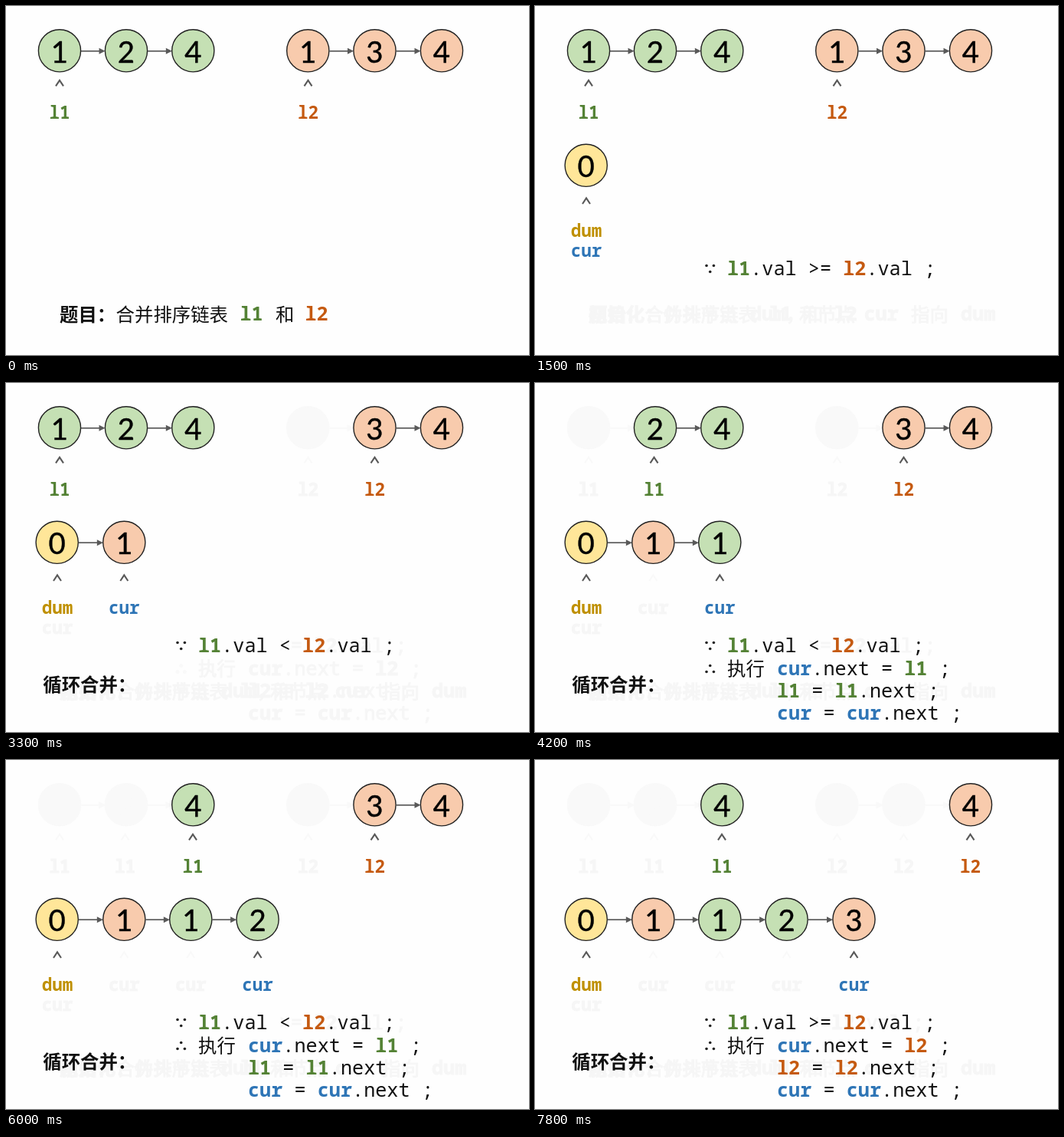
These frames come from a looping animation (683 by 455 pixels, 8000 ms). An HTML page:

```html
<!DOCTYPE html>
<html lang="zh-CN">
<head>
<meta charset="utf-8">
<title>合并排序链表</title>
<style>
  html, body { margin: 0; width: 100%; height: 100%; overflow: hidden; background: #fefefe; }
  svg { display: block; width: 100%; height: 100%; }
  text { white-space: pre; fill: #111; }
  .code { font: 25.2px "Noto Sans Mono", "DejaVu Sans Mono", monospace; }
  .label { font: bold 22.6px "Noto Sans Mono", "DejaVu Sans Mono", monospace; text-anchor: middle; }
  .zh { font: 24.4px "Noto Sans CJK SC", "Noto Sans CJK", sans-serif; }
  .num { font: 38.4px Lato, "Open Sans", sans-serif; text-anchor: middle; fill: #000; stroke: #000; stroke-width: .4; }
  .bold, .l1, .l2, .dum, .cur { font-weight: bold; }
  .l1 { fill: #548235; }
  .l2 { fill: #c55a11; }
  .dum { fill: #bf9000; }
  .cur { fill: #2e75b6; }
  circle { stroke: #222; stroke-width: 1.4; }
  line { stroke: #595959; stroke-width: 1.7; }
  .head { fill: #595959; }
  .dot { fill: #222; stroke: none; }
  polyline { fill: none; stroke: #595959; stroke-width: 2.1; }
  .ghost * { fill: #f9f9f9; stroke: #f9f9f9; }
  .ghost text, .ghost tspan { fill: #f6f6f6; stroke: #f6f6f6; stroke-width: 1; }
  .ghost .num { fill: #f9f9f9; stroke: none; }
  .ghost polyline { fill: none; }
  .wipe * { fill: #fefefe; }
</style>
</head>
<body>
<svg id="stage" viewBox="0 0 683 455" preserveAspectRatio="none"></svg>
<script>
const LOOP = 8000;
const CUTS = [500, 1500, 2400, 3300, 4200, 5100, 6000, 6900, 7800];
const GREEN = '#c5e0b4', ORANGE = '#f8cbad', YELLOW = '#ffe699';

const LISTS = {
  l1: { xs: [70, 157, 244.3], marks: [70, 155.5, 244], vals: [1, 2, 4], color: GREEN },
  l2: { xs: [394.3, 481.5, 569], marks: [394.5, 481.5, 568.5], vals: [1, 3, 4], color: ORANGE }
};
const ORDER = ['l2', 'l1', 'l1', 'l2'];
const MERGED_X = [66.7, 154.3, 241.3, 328.6, 416.5];
const GE = 'l1.val >= l2.val ;', LT = 'l1.val < l2.val ;';

// done: nodes already merged; run: list taken from in this step
const STEPS = [
  { caption: 'title' },
  { caption: 'setup', done: 0 },
  { done: 0, cond: GE },
  { done: 1, cond: GE, run: 'l2' },
  { done: 1, cond: LT, past: GE, gone: 'l2', fade: 'ghost' },
  { done: 2, cond: LT, past: GE, run: 'l1' },
  { done: 2, cond: LT, past: GE, gone: 'l1', fade: 'wipe' },
  { done: 3, cond: LT, past: GE, run: 'l1' },
  { done: 3, cond: GE, past: LT, gone: 'l1', fade: 'wipe' },
  { done: 4, cond: GE, past: LT, run: 'l2' }
];

const group = (cls, body) => `<g class="${cls}">${body}</g>`;
const ghostIf = (on, body) => on ? group('ghost', body) : body;
const text = (cls, x, y, body) => `<text class="${cls}" x="${x}" y="${y}">${body}</text>`;
const zh = (x, y, s, cls = '') => text('zh ' + cls, x, y, s);
const code = (x, y, s) => text('code', x, y, s.replace(/</g, '&lt;')
  .replace(/l1|l2|dum|cur/g, w => `<tspan class="${w}">${w}</tspan>`));

const node = (x, y, val, color) =>
  `<circle cx="${x}" cy="${y}" r="27.6" fill="${color}"/>` + text('num', x, y + 15.6, val);

function arrow(from, to, y) {
  const a = from + 28, b = to - 27.5;
  return `<line x1="${a}" y1="${y}" x2="${b - 6}" y2="${y}"/>` +
    `<path class="head" d="M${b} ${y}l-8 -4v8z"/>`;
}

const caret = (x, y) => `<polyline points="${x - 5},${y + 4} ${x},${y - 3.5} ${x + 5},${y + 4}"/>`;
const label = (name, x, y) => text('label ' + name, x, y, name);
const pointer = (name, x, y) => caret(x, y) + label(name, x, y + 47);

function dots(y, flip) {
  return [[-4.7, -4], [4.7, -4], [0, 4]].map(([dx, dy]) =>
    `<circle class="dot" cx="${228.7 + dx}" cy="${y + dy * flip}" r="1.8"/>`).join('');
}

function list(name, head) {
  const { xs, marks, vals, color } = LISTS[name];
  let faded = '', live = '';
  xs.forEach((x, i) => {
    let part = node(x, 58.3, vals[i], color);
    if (i < 2) part += arrow(x, xs[i + 1], 58.8);
    if (i <= head) part += pointer(name, marks[i], 100.3);
    if (i < head) faded += part; else live += part;
  });
  return group('ghost', faded) + live;
}

function merged(done) {
  const used = { l1: 0, l2: 0 };
  let out = ghostIf(done, label('cur', 67, 327));
  for (let i = 0; i <= done; i++) {
    const x = MERGED_X[i];
    if (i === 0) {
      out += node(x, 207.8, 0, YELLOW) + pointer('dum', 67, 254);
    } else {
      const src = ORDER[i - 1];
      out += arrow(MERGED_X[i - 1], x, 208.2) +
        node(x, 207.8, LISTS[src].vals[used[src]++], LISTS[src].color) +
        ghostIf(i < done, pointer('cur', x, 254));
    }
  }
  return out;
}

const titleText = () => zh(70, 411, '题目：', 'bold') + zh(143.6, 411, '合并排序链表') +
  code(305.5, 410, 'l1') + zh(352, 411, '和') + code(390.5, 410, 'l2');

const setupText = () => zh(70, 411, '初始化：', 'bold') + zh(167.6, 411, '伪头节点') +
  code(281, 410, 'dum') + zh(328, 411, '，') + zh(345, 411, '和节点') +
  code(429.5, 410, 'cur') + zh(491, 411, '指向') + code(556, 410, 'dum');

const action = src => dots(372.5, -1) + zh(251, 381, '执行') +
  code(316, 380.5, `cur.next = ${src} ;`) +
  code(316, 410, `${src} = ${src}.next ;`) +
  code(316, 439.3, 'cur = cur.next ;');

function draw(index) {
  const s = STEPS[index], done = s.done || 0;
  const taken = ORDER.slice(0, done);
  const head = name => taken.filter(n => n === name).length;
  let out = '';
  if (index > 0) out += group('ghost', titleText());
  if (index > 1) out += group('ghost', setupText());
  if (s.past) out += group('ghost', code(251, 351, s.past));
  if (s.gone) out += group(s.fade, action(s.gone));
  out += list('l1', head('l1')) + list('l2', head('l2'));
  if (index > 0) out += merged(done);
  if (s.caption === 'title') out += titleText();
  if (s.caption === 'setup') out += setupText();
  if (s.cond) out += dots(342.5, 1) + code(251, 351, s.cond);
  if (s.run) out += action(s.run);
  if (index > 2) out += zh(48.3, 401.6, '循环合并：', 'bold');
  return out;
}

const stage = document.getElementById('stage');
let shown = -1;

function render(now) {
  const t = now % LOOP;
  const index = CUTS.filter(c => t >= c).length;
  if (index !== shown) stage.innerHTML = draw(shown = index);
}

const start = performance.now();
function tick() {
  render(performance.now() - start);
  requestAnimationFrame(tick);
}
tick();
</script>
</body>
</html>
```
